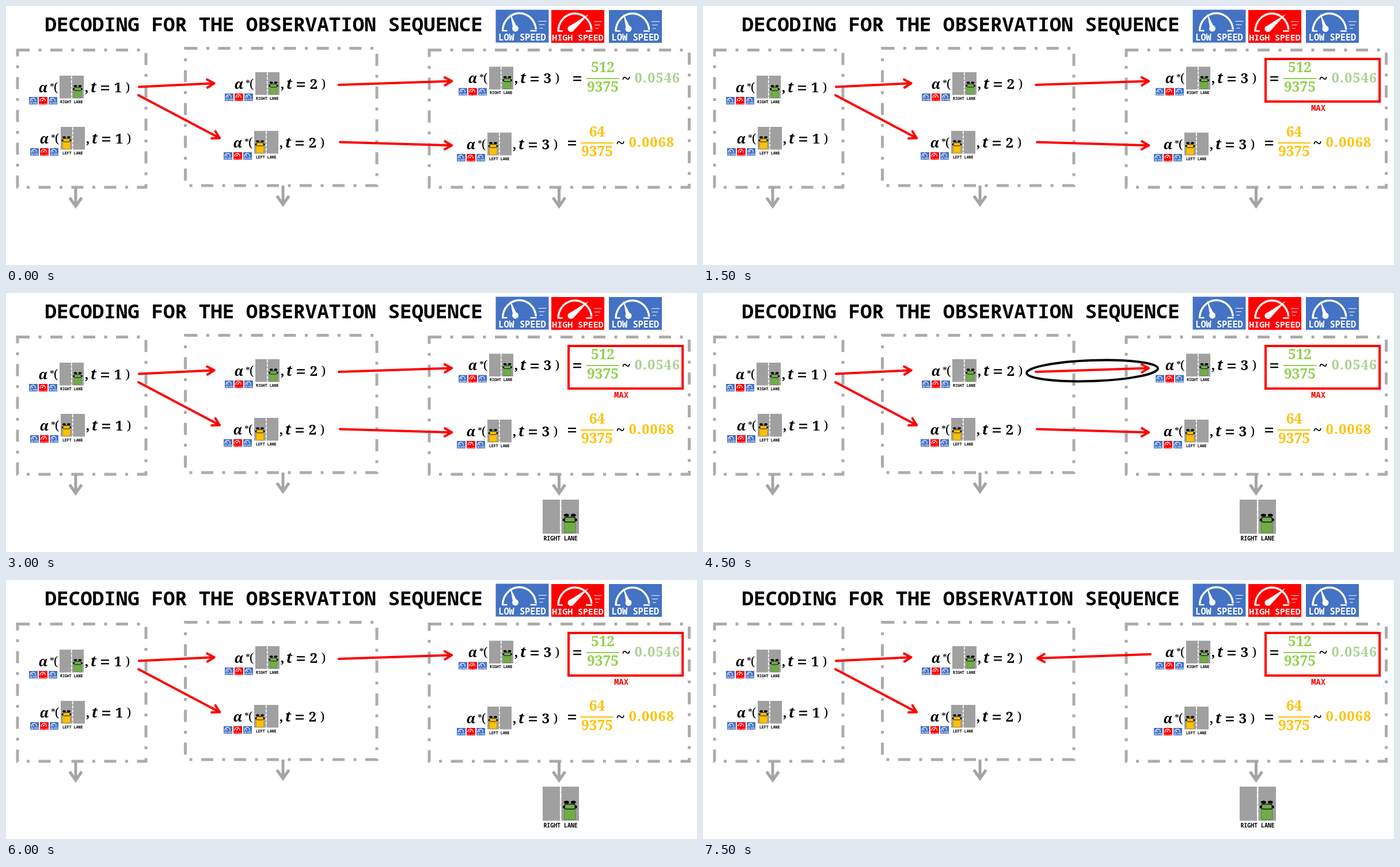
Animation, 1200 px wide and 450 px high, one loop 8 s. Source, as an HTML page with a canvas:

```html
<!DOCTYPE html>
<html lang="en">
<head>
<meta charset="utf-8">
<title>Decoding for the observation sequence</title>
<style>
html, body { margin: 0; width: 100%; height: 100%; overflow: hidden; background: #fff; }
canvas { display: block; }
</style>
</head>
<body>
<canvas id="stage" width="1200" height="450"></canvas>
<script>
const c = document.getElementById('stage').getContext('2d');
const LOOP = 8000;
const SERIF = '"Noto Serif", serif', MONO = '"Noto Sans Mono", monospace';
const BLUE = '#4472c4', RED = '#ff0000', GREEN = '#70ad47', YELLOW = '#ffc000';

function text(s, x, y, font, color = '#000', align = 'center') {
  c.font = font;
  c.fillStyle = color;
  c.textAlign = align;
  c.fillText(s, x, y);
}

function line(points, color, width) {
  c.beginPath();
  points.forEach(([x, y]) => c.lineTo(x, y));
  c.strokeStyle = color;
  c.lineWidth = width;
  c.stroke();
}

function rect(x, y, w, h, color) {
  c.fillStyle = color;
  c.fillRect(x, y, w, h);
}

function ellipse(x, y, rx, ry, from = 0, to = 2 * Math.PI, turn = 0) {
  c.beginPath();
  c.ellipse(x, y, rx, ry, turn, from, to);
}

function at(x, y, scale, draw) {
  c.save();
  c.translate(x, y);
  c.scale(scale, scale);
  draw();
  c.restore();
}

function arrow(x1, y1, x2, y2, color = RED, width = 4, back = 12, half = 7) {
  const len = Math.hypot(x2 - x1, y2 - y1);
  const ux = (x2 - x1) / len, uy = (y2 - y1) / len;
  const wing = side => [x2 - ux * back - uy * half * side, y2 - uy * back + ux * half * side];
  line([[x1, y1], [x2, y2]], color, width);
  line([wing(1), [x2, y2], wing(-1)], color, width);
}

function equals(x, y) {
  rect(x - 7, y - 4, 14, 2.3, '#000');
  rect(x - 7, y + 2, 14, 2.3, '#000');
}

// Speedometer tile; small ones are taller and have bolder strokes.
function gauge(x, y, high, w = 92, h = 57) {
  const mini = w < 50, s = w / 92, bold = mini ? 2 : 1;
  rect(x, y, w, h, high ? RED : BLUE);
  at(x, y, s, () => {
    text(high ? 'HIGH SPEED' : 'LOW SPEED', 46, h / s - 4, `bold ${high ? 14.9 : 15.3}px ${MONO}`, '#fff');
    c.translate(0, mini ? 7 : 0);
    c.lineCap = 'butt';
    c.strokeStyle = '#fff';
    c.lineWidth = 3.4 * bold;
    ellipse(41, 37, 29, 31, Math.PI, 1.97 * Math.PI);
    c.stroke();
    line([[11, 36.5], [20, 36.5]], '#fff', 2.4 * bold);
    line([[60, 36.5], [71, 36.5]], '#fff', 2.4 * bold);
    if (!mini) {
      for (let i = 0; i < 3; i++) line([[74 + i, 20 + i * 6], [88 - i * 3, 20 + i * 6]], '#fff', 1);
    }
    c.fillStyle = '#fff';
    c.beginPath();
    const tip = high ? [65, 7] : [25, 6];
    const nx = (33 - tip[1]) / 7.5, ny = (tip[0] - 34) / 7.5;
    c.moveTo(...tip);
    c.lineTo(34 + nx, 33 + ny);
    c.lineTo(34 - nx, 33 - ny);
    c.fill();
    ellipse(34, 32.5, 5.5, 5.5);
    c.fill();
  });
}

function lane(x, y, right, scale = 1) {
  at(x, y, scale, () => {
    rect(0, 0, 42, 39.5, '#a0a0a0');
    c.setLineDash([5.5, 1.7]);
    line([[20.8, 0.5], [20.8, 39.5]], '#fff', 1.7);
    c.setLineDash([]);
    const mid = right ? 31.5 : 10, color = right ? GREEN : YELLOW;
    c.fillStyle = '#000';
    for (const side of [-1, 1]) {
      ellipse(mid + side * 4, 18, 3, 1.7);
      c.fill();
      c.fillRect(mid + side * 7.3 - 0.9, 22, 1.8, 3);
    }
    rect(mid - 6.5, 25.5, 13, 12.7, color);
    c.strokeStyle = right ? '#507e32' : '#bc8c00';
    c.lineWidth = 0.6;
    c.strokeRect(mid - 6.5, 25.5, 13, 12.7);
    c.beginPath();
    c.roundRect(mid - 6, 20.3, 12, 5.7, 1.5);
    c.fillStyle = color;
    c.fill();
    c.strokeStyle = '#111';
    c.lineWidth = 1;
    c.stroke();
    text(right ? 'RIGHT LANE' : 'LEFT LANE', 20.7, 47.5, `bold 6.6px ${MONO}`);
  });
}

// One "alpha*(lane, t = n)" term placed by the corner of its road.
function term(x, y, right, step) {
  const base = y + 28.7, put = (s, dx, font, dy = 0) => text(s, x + dx, base + dy, `${font} ${SERIF}`);
  put('α', -28.5, 'italic bold 24px');
  put('*', -13, '16px', -3);
  put('(', -6.5, '22px', -1);
  put(',', 47, 'bold 24px');
  put('t', 59, 'italic bold 25px');
  equals(x + 79, base - 7.5);
  put(step, 101.5, 'bold 24px');
  put(')', 118.5, '22px', -1);
  lane(x, y, right);
  for (let i = 0; i < 3; i++) gauge(x - 53 + i * 17, y + 37, i === 1, 15, 13);
}

function result(x, y, top, value, color, valueColor, equalsX) {
  const bold = `bold 24.5px ${SERIF}`;
  equals(equalsX, y);
  text(top, x + 28.5, y - 11.5, bold, color);
  text('9375', x + 28.5, y + 22.5, bold, color);
  line([[x, y], [x + 57, y]], color, 2);
  text('~', x + 69, y + 9.5, `29px ${SERIF}`);
  c.letterSpacing = '1.4px';
  text(value, x + 123.5, y + 7, `bold 23px ${SERIF}`, valueColor);
  c.letterSpacing = '0px';
}

function dashedBox(x, y, w, h, arrowX) {
  c.lineCap = 'butt';
  c.setLineDash([21, 15.5, 5, 15.5]);
  c.strokeStyle = '#afabab';
  c.lineWidth = 5;
  c.strokeRect(x, y, w, h);
  c.setLineDash([]);
  c.lineJoin = 'miter';
  arrow(arrowX, y + h, arrowX, y + h + 33, '#a5a5a5', 5, 15, 10.5);
}

function draw(t) {
  rect(0, 0, 1200, 450, '#fff');
  text('DECODING FOR THE OBSERVATION SEQUENCE', 67.5, 44, `bold 34.25px ${MONO}`, '#000', 'left');
  gauge(850.5, 6.5, false);
  gauge(947, 7, true);
  gauge(1047, 7, false);

  dashedBox(20, 76.5, 223, 238.5, 121);
  dashedBox(311.5, 73.5, 332.5, 238.5, 481);
  dashedBox(735, 76.5, 451.5, 238.5, 960.5);

  term(93, 121, true, 1);
  term(95, 210, false, 1);
  term(433, 115, true, 2);
  term(431, 217, false, 2);
  term(839, 105.5, true, 3);
  term(836, 220, false, 3);
  result(1008, 126, '512', '0.0546', '#92d050', '#a9d18e', 992);
  result(998, 238, '64', '0.0068', YELLOW, YELLOW, 983);

  c.lineCap = c.lineJoin = 'round';
  arrow(231, 140.5, 361.5, 134.2);
  arrow(230, 155, 371, 229.5);
  if (t < 7500) arrow(578, 137, 774, 130.5);
  else arrow(777, 129, 581, 136);
  if (t < 6000) arrow(580, 236.5, 774, 242.3);

  if (t >= 1500) {
    c.lineJoin = 'miter';
    c.strokeStyle = RED;
    c.lineWidth = 4;
    c.strokeRect(977, 92, 198, 74);
    text('MAX', 1068.5, 182, `bold 14px ${MONO}`, RED);
  }
  if (t >= 3000) lane(932, 359, true, 1.5);
  if (t >= 4500 && t < 6000) {
    c.strokeStyle = '#000';
    c.lineWidth = 4;
    ellipse(676, 135, 114, 18, 0, 2 * Math.PI, -0.035);
    c.stroke();
  }
}

const start = performance.now();
function tick() {
  draw((performance.now() - start) % LOOP);
  requestAnimationFrame(tick);
}
tick();
</script>
</body>
</html>
```
